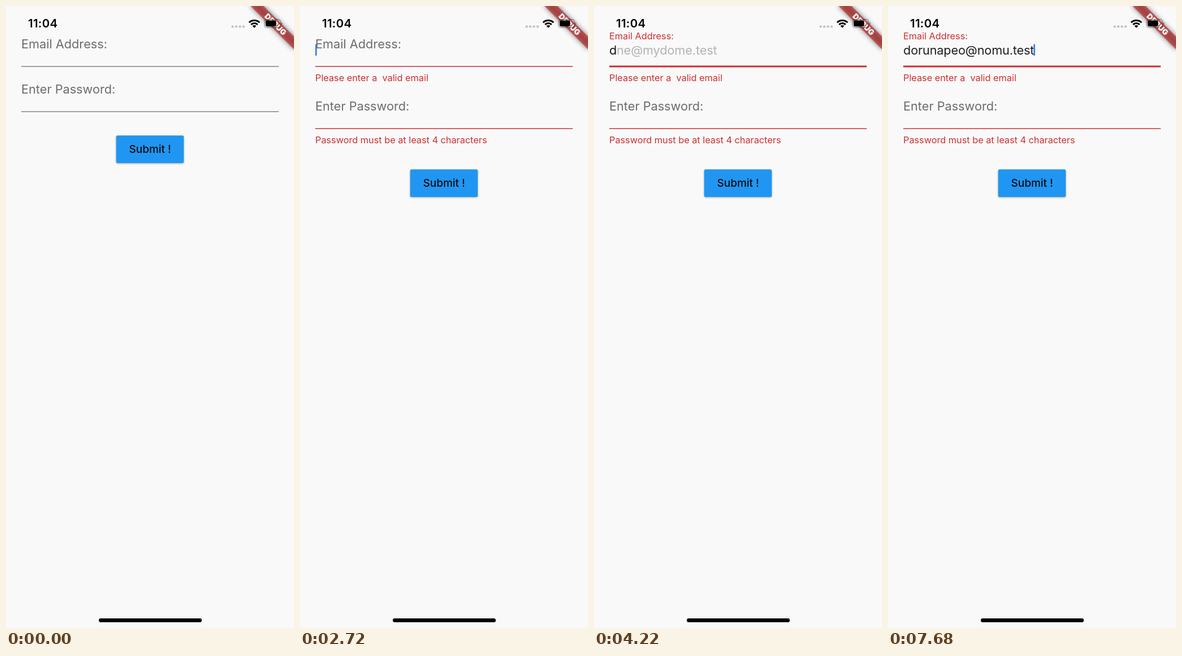
Animation, 509 px wide and 1101 px high, one loop 8 s. Source, as an HTML page:

```html
<!DOCTYPE html>
<html lang="en">
<head>
<meta charset="utf-8">
<title>Form validation</title>
<style>
  html, body { margin: 0; width: 100%; height: 100%; overflow: hidden; background: #f9f9fa; }
  svg { display: block; width: 509px; height: 1101px; }
  text { font: 400 21.7px Inter, "Noto Sans", sans-serif; font-optical-sizing: none; white-space: pre; }

  .label, .hint { fill: #6c6c6c; }
  .error { font-size: 16.28px; fill: #cc2f30; }
  .input { fill: #1f1f20; letter-spacing: -.15px; }
  .hint { letter-spacing: -.1px; }
  .line { stroke: #858585; stroke-width: 1.4px; }
  .submit { font-size: 19px; font-weight: 500; text-anchor: middle; fill: #0a0a10; }
  .clock { font-size: 20.4px; font-weight: 600; letter-spacing: .3px; }
  .debug { font-size: 13.8px; font-weight: 900; text-anchor: middle; fill: #fff; }
  .button { filter: drop-shadow(0 1.6px 1.5px rgba(0, 0, 0, .34)); }

  .error, .line, .label.email, .hint, .caret, .password, .action {
    animation: 8s linear infinite;
  }
  .error { animation-name: reveal; }
  .line { animation-name: redden; }
  .line.email { animation-name: redden, thicken; animation-duration: 8s; animation-iteration-count: infinite; }
  .label.email { animation-name: float; }
  .hint { animation-name: hint; }
  .caret { animation-name: blink; animation-timing-function: step-end; }
  .password { animation-name: drop-field; animation-timing-function: step-end; }
  .action { animation-name: drop-button; animation-timing-function: step-end; }

  @keyframes reveal {
    0%, 6.25% { opacity: 0; transform: translateY(-5px); }
    8.75%, 100% { opacity: 1; transform: none; }
  }
  @keyframes redden {
    0%, 6.25% { stroke: #858585; }
    8.75%, 100% { stroke: #cc2f30; }
  }
  @keyframes thicken {
    0%, 34.4% { stroke-width: 1.4px; }
    37%, 100% { stroke-width: 2.8px; }
  }
  @keyframes float {
    0%, 34.4% {
      transform: translate(27px, 75px) scale(1); fill: #6c6c6c;
      animation-timing-function: cubic-bezier(.4, 0, .2, 1);
    }
    37%, 100% { transform: translate(27px, 59px) scale(.75); fill: #cc2f30; }
  }
  @keyframes hint {
    0%, 34.4% { opacity: 0; }
    37%, 51.5% { opacity: 1; }
    54%, 100% { opacity: 0; }
  }
  @keyframes blink {
    0% { opacity: 0; }
    34% { opacity: 1; }
    39.875% { opacity: 0; }
    46.125% { opacity: 1; }
    52.375% { opacity: 0; }
    58.625% { opacity: 1; }
    64.875% { opacity: 0; }
    71.125% { opacity: 1; }
    77.375% { opacity: 0; }
    83.625% { opacity: 1; }
    89.625% { opacity: 0; }
    96%, 100% { opacity: 1; }
  }
  @keyframes drop-field {
    0% { transform: none; }
    6.25%, 100% { transform: translateY(30px); }
  }
  @keyframes drop-button {
    0% { transform: none; }
    6.25%, 100% { transform: translateY(60px); }
  }
</style>
</head>
<body>
<svg viewBox="0 0 509 1101">
  <defs>
    <filter id="soft" x="-30%" y="-200%" width="160%" height="500%">
      <feGaussianBlur stdDeviation="5"/>
    </filter>
  </defs>

  <!-- email field -->
  <path class="line email" d="M27 107H482"/>
  <text class="label email">Email Address:</text>
  <text class="hint" x="27" y="86">one@mydome.test</text>
  <text class="input" id="input" x="27" y="86"></text>
  <rect class="caret" id="caret" x="27" y="67.5" width="2.7" height="20.5" rx="1" fill="#3f7cf0"/>
  <text class="error" x="27" y="133">Please enter a  valid email</text>

  <!-- password field -->
  <g class="password">
    <path class="line" d="M27 187H482"/>
    <text class="label" x="27" y="155">Enter Password:</text>
    <text class="error" x="27" y="213">Password must be at least 4 characters</text>
  </g>

  <g class="action">
    <rect class="button" x="194.7" y="229.3" width="119.5" height="48.6" rx="2.7" fill="#2096f2"/>
    <text class="submit" x="254.7" y="260">Submit !</text>
  </g>

  <!-- corner banner -->
  <g transform="translate(509 0) rotate(45)">
    <rect x="-54.3" y="38" width="108.6" height="16.3" filter="url(#soft)" opacity=".5"/>
    <rect x="-54.3" y="38" width="108.6" height="16.3" fill="#b71c1c" fill-opacity=".63"/>
    <text class="debug" y="51.2">DEBUG</text>
  </g>

  <!-- status bar -->
  <text class="clock" x="39" y="38.4">11:04</text>
  <g fill="#c3c3c5">
    <circle cx="400.6" cy="36.4" r="2.2"/><circle cx="407" cy="36.4" r="2.2"/>
    <circle cx="413.5" cy="36.4" r="2.2"/><circle cx="419.9" cy="36.4" r="2.2"/>
  </g>
  <g fill="none" stroke="#000" stroke-width="2.9">
    <path d="M429.6 29.2A13.4 13.4 0 0 1 448.2 29.2"/>
    <path d="M433.1 32.9A8.3 8.3 0 0 1 444.7 32.9"/>
  </g>
  <path d="M438.9 38.8L435.5 35.3A4.9 4.9 0 0 1 442.3 35.3Z"/>
  <rect x="457" y="23.6" width="28" height="14.6" rx="4" fill="none" stroke="#000" stroke-opacity=".4" stroke-width="1.3"/>
  <path d="M486.8 28.3A3 3 0 0 1 486.8 33.5Z" opacity=".45"/>
  <rect x="458.9" y="25.5" width="18.4" height="10.8" rx="2.3"/>

  <rect x="164" y="1084" width="182" height="6.8" rx="3.4"/>
</svg>
<script>
  const LOOP = 8000;
  const address = "dorunapeo@nomu.test";
  // time at which each character is typed
  const strokes = [4120, 4400, 4550, 4670, 4830, 5000, 5060, 5230, 5430, 5830,
                   6070, 6240, 6320, 6400, 6540, 6760, 6850, 6960, 7080];
  const input = document.getElementById("input");
  const caret = document.getElementById("caret");
  let start, shown = 0;

  function draw(now) {
    start ??= now;
    const t = (now - start) % LOOP;
    const count = strokes.filter(s => s <= t).length;
    if (count !== shown) {
      shown = count;
      input.textContent = address.slice(0, count);
      const end = count ? input.getComputedTextLength() - 1 : 0;
      caret.setAttribute("x", 27 + end);
    }
    requestAnimationFrame(draw);
  }
  requestAnimationFrame(draw);
</script>
</body>
</html>
```
